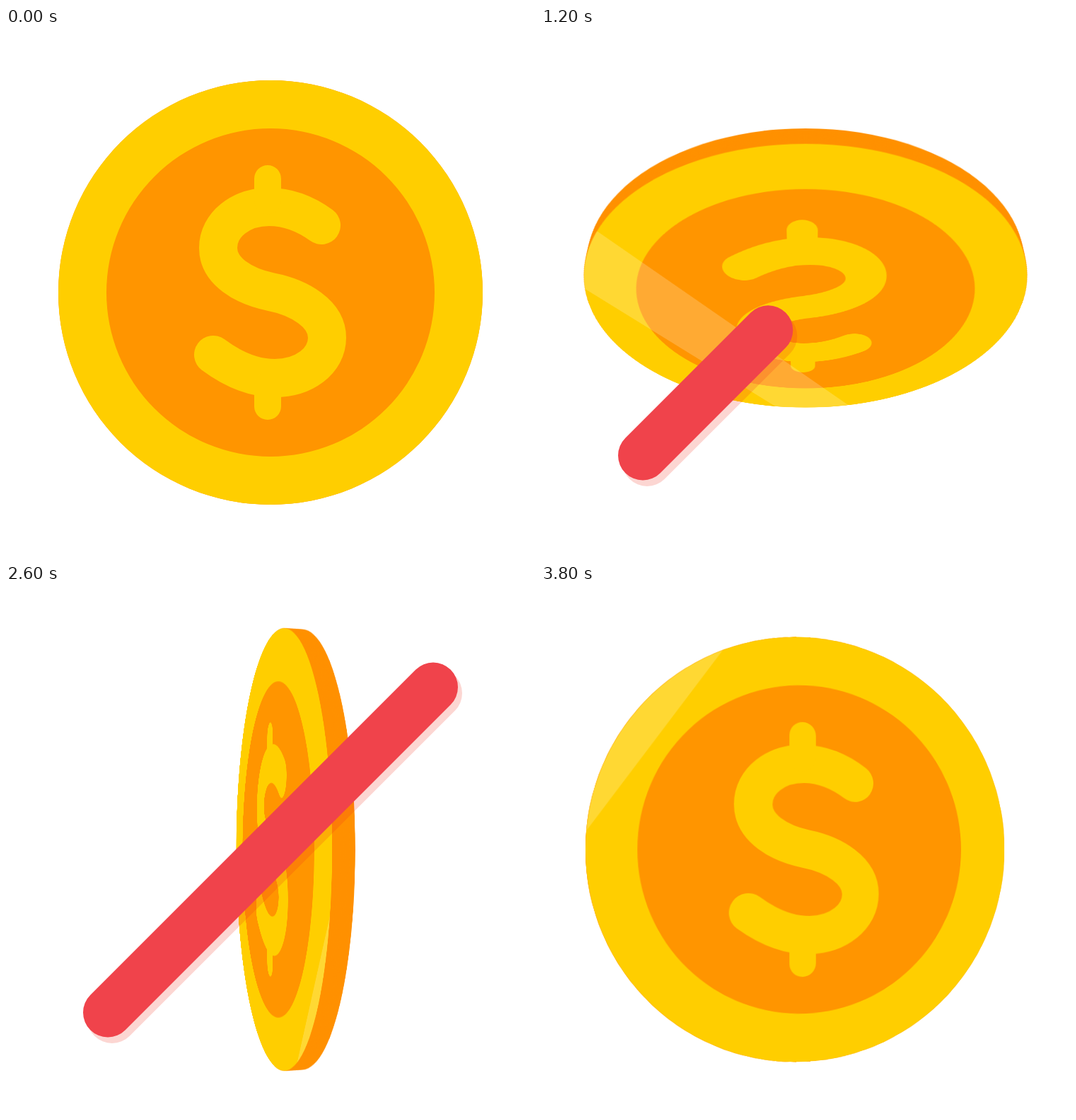
Write an HTML page without scripts that moves like this. It is 748 px wide and 748 px high and loops after 3850 ms.

```html
<!DOCTYPE html>
<html lang="en">
<head>
<meta charset="utf-8">
<title>Spinning coin</title>
<style>
  html, body { margin: 0; width: 100%; height: 100%; overflow: hidden; background: #fff; }

  .scene { position: absolute; left: 0; top: 0; width: 748px; height: 748px; perspective: 1034px; overflow: hidden; }
  .coin { position: absolute; inset: 74px; transform-style: preserve-3d; }

  .coin, .shine, .bar line {
    animation: spin 3850ms cubic-bezier(.3333, 0, .6667, 1) infinite;
  }

  .face, .art, .edge, .edge i, .art svg { position: absolute; inset: 0; }
  .face { border-radius: 50%; overflow: hidden; background: #ffce00; backface-visibility: hidden; }
  .art svg { width: 100%; height: 100%; }

  /* The far side shows the same artwork at the same place, seen from behind. */
  .back { transform: translateZ(-25px) rotateX(180deg); }
  .back .art { transform: scaleY(-1); }

  /* Each nested disc sits 2px behind its parent, together they form the rim. */
  .edge { transform: translateZ(1.5px); transform-style: preserve-3d; }
  .edge i { border-radius: 50%; background: #ff9000; transform: translateZ(-2px); transform-style: preserve-3d; }

  .shine {
    position: absolute; left: 248px; top: -50px; width: 104px; height: 700px;
    background: rgba(255, 255, 255, .2);
    animation-name: sweep;
  }

  .bar { position: absolute; left: 0; top: 0; }
  .bar line {
    stroke: #f0434b; stroke-width: 70; stroke-linecap: round; stroke-dasharray: 100 200;
    animation-name: strike;
  }
  .bar .shadow { stroke: rgba(240, 50, 30, .2); }

  /* The last turn and the second sweep are cut short by the loop. */
  @keyframes spin {
    0% { transform: rotateX(0deg) rotateY(0deg); }
    51.948% {
      transform: rotateX(-360deg) rotateY(0deg);
      animation-timing-function: cubic-bezier(.3333, 0, .6667, .8696);
    }
    100% { transform: rotateX(-360deg) rotateY(-354.23deg); }
  }
  @keyframes sweep {
    0% { transform: rotate(36deg) translateX(-453px); }
    77.92% { transform: rotate(36deg) translateX(368px); }
    77.93% {
      transform: rotate(36deg) translateX(-453px);
      animation-timing-function: cubic-bezier(.3333, 0, .6667, .411);
    }
    100% { transform: rotate(36deg) translateX(-292.6px); }
  }
  @keyframes strike {
    0%, 25.97% { stroke-dashoffset: 100; opacity: 0; }
    25.98% { stroke-dashoffset: 100; opacity: 1; }
    38.31%, 85.32% { stroke-dashoffset: 0; opacity: 1; }
    97.66% { stroke-dashoffset: -100; opacity: 1; }
    97.67%, 100% { stroke-dashoffset: -100; opacity: 0; }
  }
</style>
</head>
<body>
<svg width="0" height="0" style="position:absolute">
  <defs>
    <g id="emblem" fill="none" stroke="#ffce00" stroke-linecap="round">
      <circle cx="374" cy="374" r="232" fill="#ff9500" stroke="none"/>
      <path stroke-width="54" d="M446 279C424 263 400 253 372 253C332 253 300 278 300 311
        C300 344 336 365 374 373C415 381 454 404 454 438C454 471 421 495 380 495C348 495 320 482 293 462"/>
      <path stroke-width="38" d="M370 213V245M370 505V535"/>
    </g>
  </defs>
</svg>

<div class="scene">
  <div class="coin">
    <div class="face back">
      <div class="art">
        <svg viewBox="74 74 600 600"><use href="#emblem"/></svg>
        <div class="shine"></div>
      </div>
    </div>
    <div class="edge">
      <i><i><i><i><i><i><i><i><i><i><i><i><i></i></i></i></i></i></i></i></i></i></i></i></i></i>
    </div>
    <div class="face">
      <div class="art">
        <svg viewBox="74 74 600 600"><use href="#emblem"/></svg>
        <div class="shine"></div>
      </div>
    </div>
  </div>
  <svg class="bar" width="748" height="748" viewBox="0 0 748 748">
    <line class="shadow" x1="150" y1="613" x2="610" y2="153" pathLength="100"/>
    <line x1="144" y1="604.5" x2="604" y2="144.5" pathLength="100"/>
  </svg>
</div>
</body>
</html>
```
